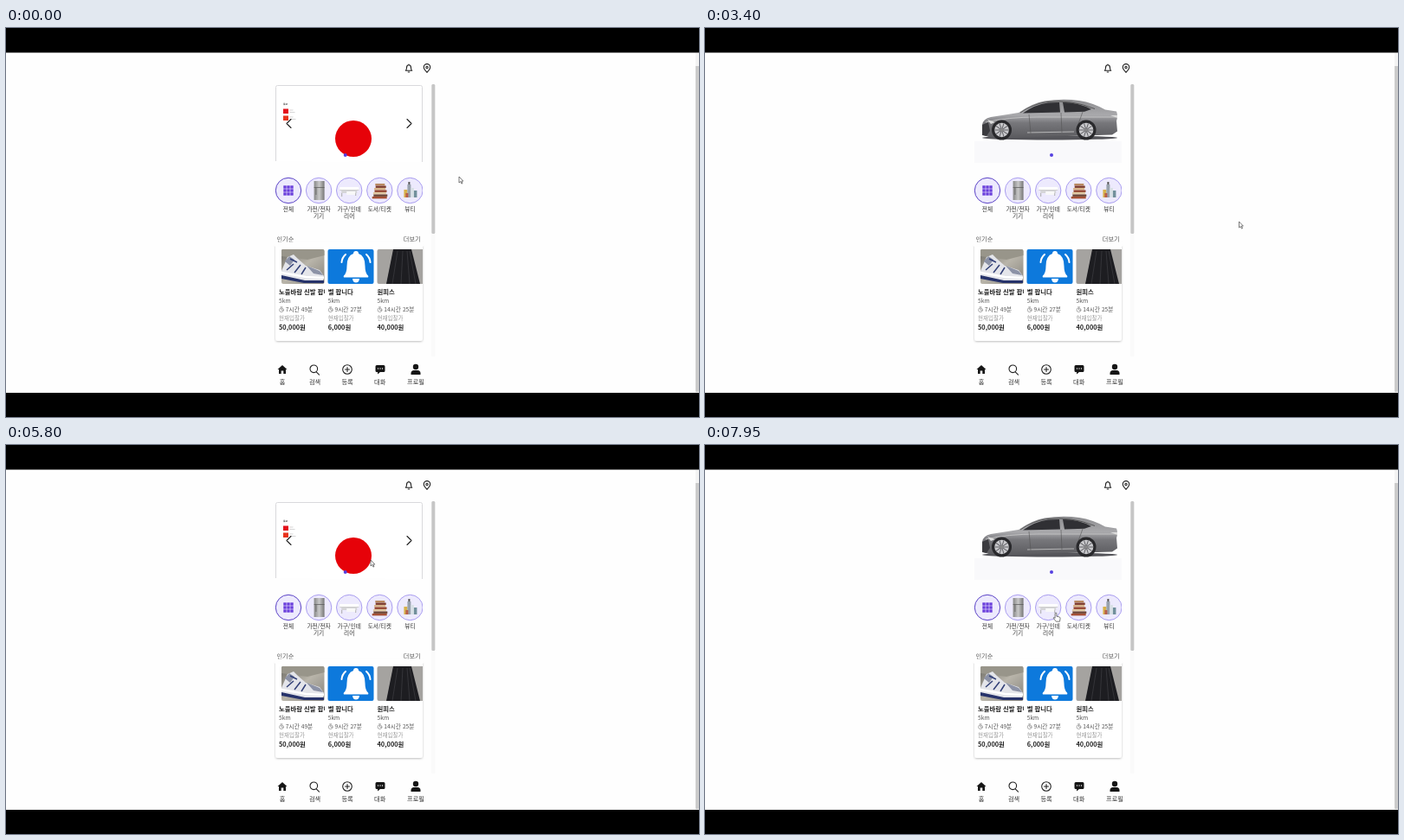
Recreate the animation shown at these times as an HTML page. Size 800 by 450 pixels, loop 8 s.

```html
<!DOCTYPE html>
<html lang="ko">
<head>
<meta charset="utf-8">
<style>
html, body { margin: 0; width: 100%; height: 100%; overflow: hidden; background: #fefefe; }
svg { display: block; width: 800px; height: 450px; }
text { font: 6.7px "Noto Sans CJK KR", "Noto Sans CJK", sans-serif; fill: #333; }
text.b { font-size: 7.35px; font-weight: 700; fill: #222; }
text.m { font-size: 7.2px; }
text.g { fill: #555; }
text.l { font-size: 6.5px; fill: #999; }
.mid { text-anchor: middle; }
.line { fill: none; stroke: #222; stroke-width: 1.1; stroke-linecap: round; stroke-linejoin: round; }
</style>
</head>
<body>
<svg viewBox="0 0 800 450">
  <defs>
    <linearGradient id="paint" x2="0" y2="1">
      <stop stop-color="#8c8c8f"/><stop offset=".4" stop-color="#a9a9ac"/>
      <stop offset=".6" stop-color="#77777b"/><stop offset="1" stop-color="#5a5a5e"/>
    </linearGradient>
    <linearGradient id="steel"><stop stop-color="#888"/><stop offset=".5" stop-color="#c8c8c8"/><stop offset="1" stop-color="#777"/></linearGradient>
    <linearGradient id="wall" x2="1" y2="1"><stop stop-color="#6f6d66"/><stop offset=".5" stop-color="#b9b5aa"/><stop offset="1" stop-color="#85827b"/></linearGradient>
    <filter id="shadow" x="-10%" y="-10%" width="120%" height="120%"><feDropShadow dx="0" dy="1" stdDeviation="1.2" flood-opacity=".25"/></filter>
    <clipPath id="view"><rect x="311" y="60" width="170" height="310"/></clipPath>
    <clipPath id="shoeClip"><rect x="318" y="256" width="49.5" height="40" rx="2"/></clipPath>
    <clipPath id="titleClip"><rect x="311" y="296" width="57" height="20"/></clipPath>
  </defs>

  <rect width="800" height="28.5"/>
  <rect y="422" width="800" height="28"/>
  <rect x="796" y="29" width="4" height="393" fill="#f3f3f3"/>
  <rect x="796" y="44" width="4" height="377" fill="#cbcbcb"/>
  <rect x="491" y="65" width="4.5" height="315" fill="#fafafa"/>
  <rect x="491.3" y="65" width="4" height="173" rx="1.5" fill="#c6c6c6"/>

  <!-- header icons -->
  <path class="line" d="M461.3 49.3q1.2-1 1.2-3.3 0-3.2 2.5-3.2t2.5 3.2q0 2.3 1.2 3.3zM464.2 51h1.6M465 42v.5"/>
  <path class="line" d="M486 51.3q-3.7-3.6-3.7-6a3.7 3.7 0 0 1 7.4 0q0 2.4-3.7 6z"/>
  <circle class="line" cx="486" cy="45.5" r="1.2"/>

  <!-- banner -->
  <g clip-path="url(#view)">
    <g id="slides">
      <path d="M311.5 154V68.500q0-2 2-2h165q2 0 2 2V155" fill="#fff" stroke="#d5d5d8" stroke-width=".9"/>
      <text x="320" y="89" style="font-size:2.800px;font-weight:700">로고</text>
      <rect x="320" y="93.500" width="6" height="5.500" fill="#e3101a"/>
      <rect x="320" y="101.500" width="6" height="5.500" fill="#e8331c"/>
      <path d="M327.500 95h4m-4 2.500h6m-6 5.500h4m-4 2.500h7" stroke="#bbb" stroke-width=".6"/>
      <circle cx="401" cy="128" r="21" fill="#e60209"/>
      <g transform="translate(170)">
        <rect x="311" y="66" width="170" height="65" fill="#fefefe"/>
        <rect x="311" y="131" width="170" height="25" fill="#f9f9fb"/>
        <ellipse cx="398" cy="127" rx="78" ry="2.500" fill="#55555a"/>
        <path d="M320 112q1-7 10-9l32-5q16-11 30-13.500 20-3 40-.5 16 2.500 30 10.500l13 2q2 5 0 11l1 12-6 4-138 4-12-4z" fill="url(#paint)"/>
        <path d="M367 98.500q14-10 29-12l13-.5 1 11.500zM413 86q18 0 33 8l-8 2.800-23 .8z" fill="#303034"/>
        <path d="M364 98q15-10.500 31-12.500 28-3 55 8" fill="none" stroke="#444" stroke-width=".8"/>
        <path d="M324 109q25-6 60-6h91M372 121l54-1" fill="none" stroke="#ccc" stroke-width=".8"/>
        <path d="M374 100l2 22M411 98l1 23M436 97l-5 14" fill="none" stroke="#555" stroke-width=".6"/>
        <path d="M320 112l7-3 2 10-4 6-5-1z" fill="#3b3b3f"/>
        <path d="M326 106l9 3-5 2zM468 101h8v3z" fill="#ddd"/>
        <g id="wheels"></g>
      </g>
    </g>
    <circle id="dot" cy="147" r="2" fill="#553fe0"/>
    <path id="arrows" class="line" d="M329 105.500l-5 5 5 5M463 105.500l5 5-5 5"/>
  </g>

  <g id="cats" clip-path="url(#view)"></g>

  <text class="m g" x="312.500" y="246.700">인기순</text>
  <text class="m g" x="458.800" y="246.700">더보기</text>

  <!-- product card -->
  <path d="M311 251h170v108q0 3-3 3H314q-3 0-3-3z" fill="#fff" filter="url(#shadow)"/>
  <rect x="310" y="247.500" width="172" height="5" fill="#fefefe"/>
  <g clip-path="url(#view)">
    <g clip-path="url(#shoeClip)">
      <rect x="318" y="256" width="50" height="40" fill="url(#wall)"/>
      <path d="M318 256h50v7l-20 5-30-4z" fill="#98958a"/>
      <path d="M318 281l7-16 7-3 5 5 9 8 16 5 5 7-1 6-21 1-27-6z" fill="#e4e5ea"/>
      <path d="M318 286l27 6h22v3h-23l-26-5z" fill="#27336b"/>
      <path d="M322 270l5-6 6 4-5 7zM347 275l15 6 4 5-11-2z" fill="#8c92a6"/>
      <path d="M324 280l8-7m1 10l7-9m1 11l5-8m-18-10l8 4" stroke="#334077" stroke-width="1.500"/>
      <path d="M318 283l28 5 21 1" fill="none" stroke="#fff" stroke-width="2.500"/>
    </g>
    <rect x="371.500" y="256" width="53" height="40" rx="2" fill="#0d79dc"/>
    <path d="M390 286.500q3.500-3 3.500-11 0-12 7.500-14.500a3 3 0 1 1 6 0q7.500 2.500 7.500 14.500 0 8 3.500 11 1 2-1 2h-26q-2 0-1-2zM400 290h8q-.5 4.500-4 4.500t-4-4.500z" fill="#fff"/>
    <path d="M392 262q-4 3.500-4.500 9M416 262q4 3.500 4.500 9" fill="none" stroke="#fff" stroke-width="2" stroke-linecap="round"/>
    <rect x="428.500" y="256" width="56" height="40" rx="2" fill="#a5a3a0"/>
    <path d="M447 256h21l10 40h-39z" fill="#1d1d21"/>
    <path d="M452 258l-6 38m12-38l-2 38m7-38l3 38m0-38l7 38" stroke="#37373c" stroke-width=".9"/>
    <g id="items"></g>
  </g>

  <!-- bottom navigation -->
  <path d="M313.500 395l5.500-5 5.500 5h-1.500v5h-2.700v-3.500h-2.600v3.500H315v-5z" fill="#161616"/>
  <path class="line" d="M358.500 398.200l3 3M359.600 394.300a4.300 4.300 0 1 1-8.600 0 4.300 4.300 0 1 1 8.600 0"/>
  <path class="line" d="M399.300 395a5.300 5.300 0 1 1-10.600 0 5.300 5.300 0 1 1 10.600 0M391.500 395h5M394 392.500v5"/>
  <path d="M428 390h8q1.500 0 1.500 1.500v5q0 1.500-1.500 1.500h-4l-3 2.500V398h-1q-1.500 0-1.500-1.500v-5q0-1.500 1.500-1.500z" fill="#161616"/>
  <path d="M429.500 394h.01m2.500 0h.01m2.500 0h.01" stroke="#fff" stroke-width="1.300" stroke-linecap="round"/>
  <circle cx="473" cy="392" r="3.200" fill="#161616"/>
  <path d="M467.500 401v-1.500q0-3.500 3.500-3.500h4q3.500 0 3.500 3.500v1.500z" fill="#161616"/>
  <g id="nav"></g>

  <g id="cursor" stroke="#444" stroke-width=".7" stroke-linejoin="round" fill="#fff">
    <path id="pointer" d="M0 0v7l1.700-1.400 1.200 2.500 1.100-.5-1.200-2.500h2z"/>
    <path id="hand" d="M-.9 1q0-1 .9-1t.9 1v3.200l3 .7q1.400.3 1.200 1.800l-.6 3.500h-4.200l-3-3.800q-.3-1 .8-.8l1 .8z"/>
  </g>
</svg>
<script>
const $ = id => document.getElementById(id);
const text = (x, y, s, cls = '') => `<text x="${x}" y="${y}" class="${cls}">${s}</text>`;
const rect = (x, y, w, h, fill) => `<rect x="${x}" y="${y}" width="${w}" height="${h}" fill="${fill}"/>`;

$('wheels').innerHTML = [342.5, 440].map(x => `<g transform="translate(${x} 118)">
  <circle r="11.500" fill="#29292c"/><circle r="8.300" fill="#c9c9cc"/>
  ${[0, 36, 72, 108, 144].map(a => `<path d="M-8 0H8" stroke="#606065" transform="rotate(${a})"/>`).join('')}
  <circle r="1.800" fill="#888"/></g>`).join('');

// category artwork, relative to each circle's centre
const grid = [...Array(9).keys()].map(i => rect(-5.7 + i % 3 * 4, -5.7 + (i / 3 | 0) * 4, 3.4, 3.4, '#6a3fdc')).join('');
const fridge = rect(-5.5, -11, 12, 22, 'url(#steel)') + rect(-5.5, -4, 12, .7, '#555') + rect(-3.5, -3, .7, 8, '#555');
const sofa = rect(-11, -4, 22, 4, '#fff') + rect(-9, 0, 18, 3, '#d5d5d8') +
  rect(-9, 3, 1, 4, '#aaa') + rect(7, 3, 1, 3, '#aaa') + rect(-3, 1, 10, 4, '#f8f8f8') + rect(-11, -1, 22, .7, '#bbb');
const books = ['#b98a62', '#7d3b2c', '#d7b48a', '#95452f', '#e0c8a2', '#6d4535', '#a54f35']
  .map((c, i) => rect(-5 - i * .6 + i % 2, -8 + i * 2.5, 11 + i, 2.4, c)).join('');
const bottles = rect(-7, -1, 4, 9, '#d8b24c') + rect(-3, -7, 4, 15, '#98a2ad') + rect(-2, -10, 2, 3, '#555') +
  rect(1, -3, 3.500, 11, '#d9e1e6') + rect(4.500, 0, 3.500, 8, '#72909c') + rect(-5, 3, 3, 5, '#b65e4b');

$('cats').innerHTML = [
  [grid, '전체'], [fridge, '가전/전자', '기기'], [sofa, '가구/인테', '리어'], [books, '도서/티켓'], [bottles, '뷰티']
].map(([art, name, rest = ''], i) => {
  const x = 326 + i * 35.1;
  return `<g transform="translate(${x} 188)"><circle r="14.700" fill="#edeafd" stroke="${i ? '#a99df0' : '#5a42c6'}"/>${art}</g>` +
    text(x, 212, name, 'mid') + text(x, 220.3, rest, 'mid');
}).join('');

$('items').innerHTML = [
  [315, '노을바람 신발 팝니다', '7시간 49분', '50,000원'],
  [371.7, '벨 팝니다', '9시간 27분', '6,000원'],
  [428.500, '원피스', '14시간 25분', '40,000원']
].map(([x, title, left, price], i) =>
  `<g ${i ? '' : 'clip-path="url(#titleClip)"'}>${text(x, 307.8, title, 'b')}</g>` +
  text(x, 318.4, '5km', 'g') + text(x + 7.8, 328.4, left, 'g') +
  `<path d="M${x + 3} 324.200v2l1.200.6M${x + 2} 322.800h2" class="line" style="stroke:#777;stroke-width:.6"/>
   <circle cx="${x + 3}" cy="326.200" r="2.400" class="line" style="stroke:#777;stroke-width:.6"/>` +
  text(x, 338.3, '현재입찰가', 'l') + text(x, 348.9, price, 'b')).join('');

$('nav').innerHTML = [[319, '홈'], [356.5, '검색'], [394, '등록'], [431.7, '대화'], [473, '프로필']]
  .map(([x, s]) => text(x, 412.3, s, 'm mid')).join('');

// keyframes: [time, ...values], eased between neighbours
const path = [
  [50, 523, 172], [850, 535.500, 177], [3250, 535.500, 177], [3550, 696, 270], [3850, 560, 118],
  [4050, 453, 160], [4400, 366, 190], [4900, 366, 190], [5700, 421, 133], [5800, 421, 133],
  [6000, 434, 127], [6250, 409, 126], [6600, 300, 125], [6800, 286, 125], [7100, 286, 125],
  [7450, 315, 150], [7900, 405, 194]
];
const shift = [
  [1250, 0], [1700, -170], [4750, -170], [5200, 0], [6020, 0], [6250, -26], [6600, -118],
  [6800, -122], [7100, -125], [7420, -170]
];
function track(keys, t) {
  const i = keys.findIndex(k => k[0] > t);
  if (i < 1) return (i ? keys[keys.length - 1] : keys[0]).slice(1);
  const [a, b] = [keys[i - 1], keys[i]];
  const p = (t - a[0]) / (b[0] - a[0]), e = p * p * (3 - 2 * p);
  return a.slice(1).map((v, j) => v + (b[j + 1] - v) * e);
}
const within = (t, a, b) => t >= a && t < b;

function draw(now) {
  const t = now % 8000;
  const [x, y] = track(path, t);
  $('slides').setAttribute('transform', `translate(${track(shift, t)[0]})`);
  $('dot').setAttribute('cx', within(t, 1250, 4750) || t >= 7100 ? 400 : 391.7);
  $('arrows').style.display = within(t, 1750, 4800) || t >= 7500 ? 'none' : '';
  const hover = x > 311 && x < 481 && y > 172 && y < 222;
  $('cursor').setAttribute('transform', `translate(${x} ${y})`);
  $('hand').style.display = hover ? '' : 'none';
  $('pointer').style.display = hover ? 'none' : '';
  requestAnimationFrame(draw);
}
draw(performance.now());
</script>
</body>
</html>
```
